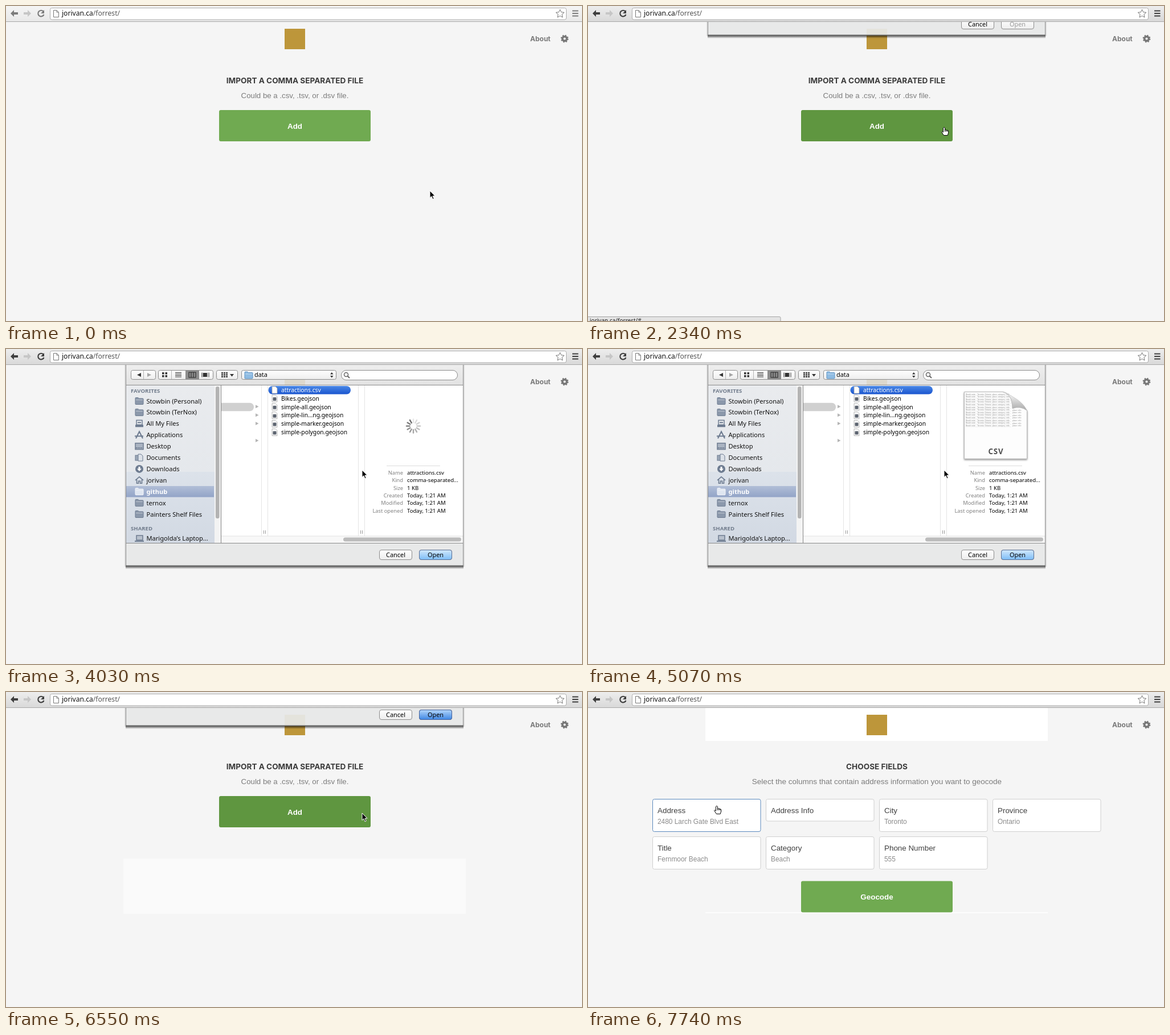
Write an HTML page that moves like this. It is 1011 px wide and 554 px high and loops after 8000 ms.

```html
<!DOCTYPE html>
<html lang="en">
<head>
<meta charset="utf-8">
<title>Import a file</title>
<style>
html, body { margin: 0; width: 100%; height: 100%; overflow: hidden; background: #f5f5f5; }
svg { display: block; }
text { white-space: pre; }
.mac { font-family: "Noto Sans", "Open Sans", sans-serif; }
.head { font-family: Inter, sans-serif; font-weight: 700; }
.body { font-family: "Liberation Sans", Arial, sans-serif; }
</style>
</head>
<body>
<svg id="stage" width="1011" height="554" viewBox="0 0 1011 554"></svg>
<script>
const $ = id => document.getElementById(id);
const range = n => [...Array(n).keys()];
const rect = (x, y, w, h, fill, more = '') => `<rect x="${x}" y="${y}" width="${w}" height="${h}" fill="${fill}" ${more}/>`;
const path = (d, fill, more = '') => `<path d="${d}" fill="${fill}" ${more}/>`;
const line = (d, color, width = 1, more = '') => path(d, 'none', `stroke="${color}" stroke-width="${width}" ${more}`);
const circle = (x, y, r, fill, more = '') => `<circle cx="${x}" cy="${y}" r="${r}" fill="${fill}" ${more}/>`;
const label = (x, y, s, size, fill, font = 'mac', more = '') =>
  `<text x="${x}" y="${y}" font-size="${size}" fill="${fill}" class="${font}" ${more}>${s}</text>`;
const group = (id, content, more = '') => `<g id="${id}" ${more}>${content}</g>`;
const gradient = (id, top, bottom) =>
  `<linearGradient id="${id}" x2="0" y2="1"><stop stop-color="${top}"/><stop offset="1" stop-color="${bottom}"/></linearGradient>`;
const clip = (id, x, y, w, h) => `<clipPath id="${id}">${rect(x, y, w, h, '#000')}</clipPath>`;
const middle = 'text-anchor="middle"', bold = 'font-weight="700"';

const defs = `<defs>
  ${gradient('bar', '#ededed', '#d9d9d9')}${gradient('side', '#e9ebee', '#e5e8ec')}${gradient('sideLow', '#dce2ea', '#d2d9e3')}
  ${gradient('row', '#b1bed7', '#92a4c7')}${gradient('pick', '#4a88e6', '#1a55cf')}
  ${gradient('btn', '#ffffff', '#ededed')}${gradient('blue', '#d2e8fc', '#7dbdf7')}
  ${gradient('deep', '#b2d5fa', '#3f87e4')}${gradient('tool', '#f0f0f0', '#dfdfdf')}
  ${gradient('fold', '#ffffff', '#a8a8a8')}${gradient('drop', '#000000a0', '#00000000')}
  ${clip('sideClip', 211, 64, 155, 277)}${clip('listClip', 378, 64, 424, 265)}
  ${clip('sheetClip', 662, 76, 81, 62)}
  <filter id="shadow" x="-5%" y="-5%" width="110%" height="110%">
    <feDropShadow dx="0" dy="1.5" stdDeviation="1.5" flood-opacity=".5"/></filter>
</defs>`;

// Page
const bigButton = (id, y, s) => rect(374, y, 266, 55, '#70aa51', `id="${id}" rx="3"`) +
  label(507, y + 32.5, s, 13.4, '#fff', 'body', middle + bold);
const intro = (title, sub, size) => label(507, 135.5, title, 13.6, '#3b3b3b', 'head', middle) +
  label(507, 161.5, sub, size, '#7c7c7c', 'body', middle);

const cards = [
  ['Address', '2480 Larch Gate Blvd East'], ['Address Info', ''], ['City', 'Toronto'], ['Province', 'Ontario'],
  ['Title', 'Fernmoor Beach'], ['Category', 'Beach'], ['Phone Number', '555']
].map(([title, sub], i) => ({ title, sub, x: 113.5 + i % 4 * 199, y: i < 4 ? 188.5 : 254.5, h: sub ? 57 : 38.5 }));

const cardArt = ({ title, sub, x, y, h }, i) =>
  rect(x, y, 189.5, h, '#fff', `id="card${i}" rx="3" stroke="#cfcfcf"`) +
  label(x + 8.5, y + 24, title, 13.4, '#404040', 'body') + label(x + 8.5, y + 43, sub, 11.9, '#8a8a8a', 'body');

const page = rect(0, 0, 1011, 554, '#f5f5f5') +
  group('glow', rect(206, 293, 601, 97, '#fafafa')) +
  group('band', rect(206, 28, 601, 58, '#fff') + rect(206, 387.5, 601, 1.5, '#fff')) +
  rect(489, 40, 36, 36, '#bd963a') +
  label(920, 61.5, 'About', 12, '#7a7a7a', 'head') +
  circle(980.5, 57.5, 3.8, 'none', 'stroke="#777" stroke-width="3.4"') +
  circle(980.5, 57.5, 5.6, 'none', 'stroke="#777" stroke-width="2.6" stroke-dasharray="2.2"') +
  group('importPage', intro('IMPORT A COMMA SEPARATED FILE', 'Could be a .csv, .tsv, or .dsv file.', 13.25) + bigButton('add', 183, 'Add')) +
  group('fieldsPage', intro('CHOOSE FIELDS', 'Select the columns that contain address information you want to geocode', 13.5) +
    cards.map(cardArt).join('') + bigButton('geocode', 332.5, 'Geocode'));

// File dialog
const folder = (x, y, fill, edge) =>
  path(`M${x} ${y - 5}q0-1 1-1h4l1.500 1.500h6.500q1 0 1 1v8.500q0 1-1 1h-12q-1 0-1-1z`, fill, `stroke="${edge}"`) +
  line(`M${x + 1} ${y - 2}h12`, '#fff', 1, 'opacity=".45"');
const doc = (x, y, mark) => path(`M${x} ${y - 6}h6l3 3v9h-9z`, '#fdfdfd', 'stroke="#a5a5a5" stroke-width=".8"') +
  (mark ? rect(x + 1.5, y - 2, 6, 6, mark, 'rx="1"') : '');
const grey = '#6d7b90';
const sideIcon = {
  folder: y => folder(227, y, '#8b98ab', grey),
  pale: y => folder(227, y, '#dfe6f1', '#f4f6fa'),
  tray: y => rect(229, y - 6, 10, 8, 'none', `stroke="${grey}" stroke-width="1.500"`) + rect(227, y + 2, 14, 4, grey) + line(`M231 ${y - 2}h6`, grey, 2),
  apps: y => line(`M228 ${y + 6}l6-12 6 12M226 ${y + 2}h15`, grey, 2),
  desk: y => rect(227, y - 5.5, 14, 11, '#aab4c2', `stroke="${grey}" stroke-width="1.500"`) + line(`M228 ${y + 3}h12`, grey, 2, 'stroke-dasharray="2 1"'),
  docs: y => rect(227, y - 4, 7, 9, '#9aa6b6', `stroke="${grey}"`) + path(`M232 ${y - 6}h5l3 3v9h-8z`, '#dde2e9', `stroke="${grey}"`),
  down: y => circle(234, y, 7, grey) + path(`M232.500 ${y - 4}h3v3.500h2.500l-4 4.500-4-4.500h2.500z`, '#fff'),
  home: y => line(`M227 ${y}l7-6 7 6M229.500 ${y - 1}v6.500h3v-4h3v4h3v-6.500`, grey, 1.6),
  laptop: y => rect(229, y - 5, 11, 8, '#b8c0cc', `stroke="${grey}" stroke-width="1.500"`) + rect(226, y + 4, 16, 2, grey)
};
const places = [['folder', 'Stowbin (Personal)'], ['folder', 'Stowbin (TerNox)'], ['tray', 'All My Files'], ['apps', 'Applications'],
  ['desk', 'Desktop'], ['docs', 'Documents'], ['down', 'Downloads'], ['home', 'jorivan'], ['pale', 'github'],
  ['folder', 'ternox'], ['folder', 'Painters Shelf Files']];
const place = ([kind, name], y, chosen) => sideIcon[kind](y) +
  label(246.5, y + 4, name, 11.1, chosen ? '#fff' : '#111', 'mac', chosen ? bold : 'font-weight="500"');
const sidebar = `<g clip-path="url(#sideClip)">` + rect(211, 64, 155, 152, 'url(#side)') +
  rect(211, 216, 155, 125, 'url(#sideLow)') + rect(211, 241, 154, 19.5, 'url(#row)') +
  label(219, 77, 'FAVORITES', 9.6, '#707b8b', 'mac', bold) + label(219, 318.5, 'SHARED', 9.6, '#707b8b', 'mac', bold) +
  places.map((p, i) => place(p, 91.5 + i * 19.9, i === 8)).join('') +
  place(['laptop', 'Marigolda’s Laptop...'], 333) + '</g>' +
  rect(366, 64, 11, 277, '#f3f3f3') + rect(368, 66, 6.5, 232, '#b3b3b3', 'rx="3"') + rect(377, 64, 1, 277, '#858585');

const rowY = i => 72 + i * 14.9;
const pill = (x, i, w, fill, more = '') => rect(x, rowY(i) - 7, w, 14.5, fill, 'rx="7" ' + more);
const item = (x, i, s, more = '') => label(x, rowY(i) + 3.7, s, 10.3, '#000', 'mac', 'font-weight="500" ' + more);
const arrow = (x, i) => path(`M${x} ${rowY(i) - 3.500}l5.500 3-5.500 3z`, '#b5b5b5');
const blueFolder = (x, y) => folder(x, y, '#8fbce3', '#5f93c4');

const tree = ['big.css', 'big.js', 'data', 'iframes', 'images', 'index.html', 'js'];
const files = ['attractions.csv', 'Bikes.geojson', 'simple-all.geojson', 'simple-lin...ng.geojson', 'simple-marker.geojson', 'simple-polygon.geojson'];
const facts = [['Name', 'attractions.csv'], ['Kind', 'comma-separated...'], ['Size', '1 KB'],
  ['Created', 'Today, 1:21 AM'], ['Modified', 'Today, 1:21 AM'], ['Last opened', 'Today, 1:21 AM']];
const treeIcon = i => i < 2 ? doc(469, rowY(i), '#5f9c6b') : i === 5 ? doc(469, rowY(i)) + circle(473.5, rowY(i) + 1, 3, '#d8633f') : blueFolder(467, rowY(i));

const tiny = (x, y, s) => label(x, y, s, 3.2, '#8c8c8c');
const sheet = path('M660.5 75.500H728Q744 78 745 104Q760 100 770.500 108V193H660.500z', '#fdfdfd', 'stroke="#b9b9b9" filter="url(#shadow)"') +
  `<g clip-path="url(#sheetClip)">` + range(13).map(i => tiny(663, 80.5 + i * 4.6, 'Beach note    Toronto  Ontario  place  category  info') +
    line(`M662 ${81.7 + i * 4.6}h82`, '#ddd', .5)).join('') + '</g>' +
  range(7).map(i => tiny(745, 108.5 + i * 4.6, 'place  info')).join('') +
  path('M728 75.500Q746 80 745 105Q758 99 770.500 108Q762 89 728 75.500z', 'url(#fold)', 'stroke="#bbb" stroke-width=".6"') +
  label(716, 185, 'CSV', 13.3, '#4d4d4d', 'mac', middle + bold + ' letter-spacing=".8"');
const preview = rect(668, 205, 94, 1, '#dcdcdc') +
  facts.map(([k, v], i) => label(697, 221 + i * 13.3, k, 9.3, '#808080', 'mac', 'text-anchor="end"') +
    label(704, 221 + i * 13.3, v, 9.6, '#000', 'mac', 'font-weight="500"')).join('') +
  group('spinner', range(12).map(i => line('M0-6.500V-12', '#444', 2.4, `stroke-linecap="round" opacity="${.12 + i * .06}" transform="rotate(${i * 30})"`)).join('')) +
  group('sheet', sheet);

const columns = group('columns',
  [450, 620, 790].map(x => line(`M${x + .5} 64V329M${x + 11.5} 64V329`, '#e4e4e4') + line(`M${x + 4.5} 319v6M${x + 7.5} 319v6`, '#999')).join('') +
  pill(340, 0, 97, '#d6d6d6') + item(377.5, 0, '-your-data') + arrow(440, 0) +
  pill(463, 2, 144, '#d0d0d0') + pill(463, 2, 144, 'url(#pick)', 'id="dataPick"') +
  tree.map((s, i) => treeIcon(i) + item(485, i, s, i === 2 ? 'id="dataText"' : '') + ([2, 3, 4, 6].includes(i) ? arrow(610, i) : '')).join('') +
  pill(632.5, 0, 144.5, 'url(#pick)', 'id="filePick"') +
  files.map((s, i) => doc(639, rowY(i), i ? '#5d6470' : '') + item(655, i, s, i ? '' : 'id="fileText"')).join('') +
  group('preview', preview, 'transform="translate(172)"'));

const box = (x, y, w, h, more = 'rx="3"') => rect(x + .5, y + .5, w - 1, h - 1, 'url(#btn)', 'stroke="#8c8c8c" ' + more);
const toolbar = rect(211, 20, 591, 44, 'url(#tool)', 'fill-opacity=".88"') + rect(211, 63, 591, 1, '#8c8c8c') +
  box(219, 37, 44, 17) + rect(241, 38, 1, 15, '#b5b5b5') + path('M237 42v7l-7-3.500z', '#333') + path('M248 42v7l7-3.500z', '#a5a5a5') +
  box(267, 37, 97, 17) + rect(315, 37.5, 24, 16, '#8d8d8d') + rect(290, 38, 1, 15, '#b5b5b5') +
  range(4).map(i => rect(274 + i % 2 * 5.5, 41 + (i >> 1) * 5, 3.5, 3.5, '#333')).join('') +
  line('M297 41.500h11M297 44h11M297 46.500h11M297 49h11', '#333') +
  rect(321, 41, 12, 9, 'none', 'stroke="#222"') + line('M325 41v9M329 41v9', '#222') +
  rect(346, 42, 7, 7, '#333') + line('M343.500 41.500v8M345 41.500v8M354.500 41.500v8M356.500 41.500v8', '#555', .8) +
  box(369, 37, 38, 17) + range(9).map(i => rect(378 + i % 3 * 4, 41 + (i / 3 | 0) * 3.3, 3, 2.3, '#333')).join('') + path('M393 44h7l-3.500 4.500z', '#333') +
  box(413, 37, 167, 17) + blueFolder(419, 46) + label(436, 49.3, 'data', 10.9, '#000', 'mac', 'font-weight="500"') +
  path('M569 44.500l2.750-3.500 2.750 3.500zM569 47l2.750 3.500 2.750-3.500z', '#333') +
  rect(588.5, 37.5, 204, 17, '#fff', 'rx="8.500" stroke="#8c8c8c"') + circle(597, 45, 3.5, 'none', 'stroke="#666" stroke-width="1.500"') + line('M599.500 47.500l3.500 3.500', '#666', 2);

const footer = rect(211, 341, 591, 40, '#e8e9e9', 'fill-opacity=".93"') + rect(211, 341, 591, 1, '#8a8a8a') +
  box(655, 353, 58, 18, 'rx="3.500"') + label(684, 366, 'Cancel', 10.9, '#000', 'mac', middle + 'font-weight="500"') +
  box(725, 353, 58, 18, 'rx="3.500"') +
  group('openBlue', rect(725.5, 353.5, 57, 17, 'url(#blue)', 'rx="3.500" stroke="#5a6f94"') +
    rect(725.5, 353.5, 57, 17, 'url(#deep)', 'id="pulse" rx="3.500" stroke="#48639a"')) +
  label(754, 366, 'Open', 10.9, '#999', 'mac', middle + 'id="openText" font-weight="500"');

const edges = [210, 802].map(x => rect(x, 20, 1, 362, '#8e8e8e')).join('') +
  [208, 803].map(x => rect(x, 20, 2, 363, '#000', 'opacity=".1"')).join('') +
  rect(210, 380.5, 593, 1.5, '#666') + rect(210, 382, 593, 5, 'url(#drop)');

const dialog = group('dialog', toolbar + footer + sidebar + rect(378, 64, 424, 277, '#fff') +
  `<g clip-path="url(#listClip)">${columns}</g>` +
  rect(378, 329, 424, 12, '#f8f8f8') + rect(378, 328.5, 424, 1, '#e4e4e4') +
  rect(540, 331.5, 259, 7, '#bcbcbc', 'id="thumb" rx="3.500"') + edges);

// Browser frame
const backArrow = 'M8 13l6-6v4h7v4h-7v4z';
const browser = rect(0, 0, 1011, 27, 'url(#bar)') + rect(0, 27, 1011, 1, '#a8a8a8') +
  rect(0, 0, 1011, 27, '#fff', 'id="idle" opacity=".4"') +
  rect(77.5, 3.5, 906, 20.5, '#fff', 'rx="3" stroke="#acacac"') +
  group('icons', path(backArrow, '#3f3f3f') + line('M65.500 9.500a5.300 5.300 0 1 0 1 5.500', '#3f3f3f', 2.2) + path('M67 7v6h-6z', '#3f3f3f') +
    line('M994 8.500h10.500M994 13h10.500M994 17.500h10.500', '#3f3f3f', 2.2)) +
  path(backArrow, '#c6c6c6', 'transform="matrix(-1 0 0 1 52 0)"') +
  path('M83.500 7.500h5.500l3.500 3.500v8.500h-9zM89 7.500v3.500h3.500', '#fff', 'stroke="#777"') +
  path('M972.500 6l2.100 4.800 5.200.5-3.900 3.500 1.100 5.200-4.500-2.700-4.500 2.700 1.100-5.200-3.900-3.500 5.200-.5z', '#fff', 'stroke="#777"') +
  label(98, 17, 'jorivan.ca<tspan fill="#555">/forrest/</tspan>', 12.1, '#111', 'mac', 'font-weight="500"') +
  group('status', rect(-2, 546.5, 340, 12, '#e4e4e4', 'rx="2" stroke="#a5a5a5"') + label(3, 557, 'jorivan.ca/forrest/#', 10, '#222'));

const cursor = group('pointer', path('M0 0V12.500L2.900 9.800 5 14.800 7.100 13.900 5 9.100H9z', '#000', 'stroke="#fff"')) +
  group('hand', path('M-1.500 8V1.500Q0-1 1.500 1.500V5q1.500-.8 2.300.4 1.500-.6 2.200.6 1.600-.3 1.600 1.200V10L6.200 14.500H-.5L-4.500 8.500q.5-2 3 .5zM1.500 5v3M3.800 5.400V8M6 6V8', '#fff', 'stroke="#000" stroke-linejoin="round"'));

$('stage').innerHTML = defs + page + dialog + browser + cursor;

// Timeline
const LOOP = 8000, TICK = 148;
const ease = p => p * p * (3 - 2 * p);
// Rises to 1 in n hard steps, the first at a and the last at b.
const steps = (t, a, b, n) => Math.max(0, Math.min(n, Math.floor((t - a) / (b - a) * (n - 1) + 1e-6) + 1)) / n;
const show = (id, on) => $(id).setAttribute('visibility', on ? 'inherit' : 'hidden');
const set = (id, name, value) => $(id).setAttribute(name, value);

function cursorAt(t) {
  const a = ease(steps(t, 1070, 1810, 6)), b = ease(steps(t, 7300, 7740, 4));
  return [744 - 119 * a - 399 * b, 325 - 112 * a - 13 * b];
}

function dialogShift(t) {
  if (t < 2340 || t >= 6700) return -400;
  if (t < 2550) return -330;
  if (t < 2700) return -100;
  return t < 6400 ? 0 : t < 6550 ? -94 : -322;
}

function draw(t) {
  const [x, y] = cursorAt(t), fields = t >= 6850, picked = t >= 3590;
  const inside = c => x > c.x && x < c.x + 190 && y > c.y && y < c.y + c.h;
  const onAdd = !fields && x < 640 && y < 238;

  show('idle', t < 600);
  set('icons', 'opacity', t < 600 ? .65 : 1);
  set('status', 'opacity', steps(t, 1660, 1810, 2) - steps(t, 2990, 3140, 2));

  show('importPage', !fields);
  show('fieldsPage', fields);
  show('glow', t >= 6550 && !fields);
  show('band', t >= 6700);
  set('add', 'fill', onAdd ? '#5f9640' : '#70aa51');
  cards.forEach((c, i) => set('card' + i, 'stroke', fields && inside(c) ? '#5b89bd' : '#cfcfcf'));

  const shift = dialogShift(t), scroll = ease(steps(t, 3737, 4030, 3));
  show('dialog', shift > -400);
  set('dialog', 'transform', `translate(0 ${shift})`);
  set('columns', 'transform', `translate(${-172 * scroll})`);
  set('thumb', 'x', 540 + 52 * scroll);
  set('thumb', 'width', 259 - 52 * scroll);
  show('dataPick', !picked);
  set('dataText', 'fill', picked ? '#000' : '#fff');
  show('filePick', picked);
  set('fileText', 'fill', picked ? '#fff' : '#000');
  show('preview', picked);

  const tick = Math.floor((t - 4030) / TICK);
  show('spinner', t < 4770);
  set('spinner', 'transform', `translate(715 135.5) rotate(${tick * 60})`);
  set('sheet', 'opacity', steps(t, 4770, 4917, 2));
  show('openBlue', picked);
  set('openText', 'fill', picked ? '#000' : '#999');
  set('pulse', 'opacity', t >= 6400 ? 1 : .5 - .5 * Math.cos(2 * Math.PI * tick * TICK / 1040));

  const hand = fields ? cards.some(inside) : onAdd && t < 2550;
  show('hand', hand);
  show('pointer', !hand);
  set(hand ? 'hand' : 'pointer', 'transform', `translate(${x} ${y})`);
}

function loop() {
  draw(performance.now() % LOOP);
  requestAnimationFrame(loop);
}
loop();
</script>
</body>
</html>
```
